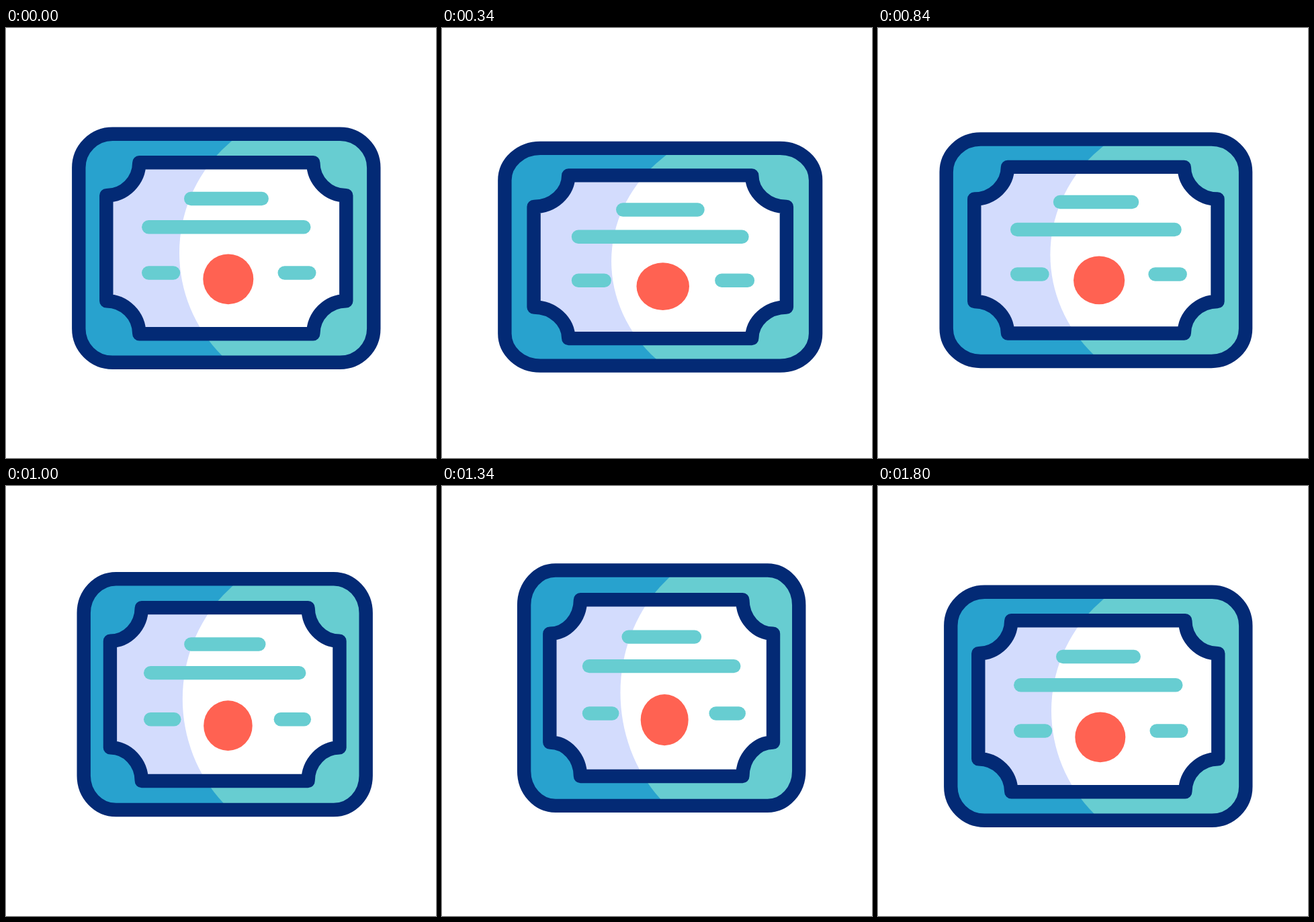
Recreate the animation shown at these times as an HTML page with a canvas. Size 640x640 px, loop 1820 ms.

```html
<!DOCTYPE html>
<html lang="en">
<head>
<meta charset="utf-8">
<title>Certificate bounce</title>
<style>
html, body { margin: 0; width: 100%; height: 100%; overflow: hidden; background: #fff; }
canvas { display: block; width: 640px; height: 640px; }
</style>
</head>
<body>
<canvas id="stage" width="640" height="640"></canvas>
<script>
const ctx = document.getElementById('stage').getContext('2d');
const LOOP = 1820, STEP = 20, BEAT = 600;
const NAVY = '#032a75', TEAL = '#67cdd1', BLUE = '#28a2ce';
const LILAC = '#d3dcfd', RED = '#ff6252', WHITE = '#fff';

// Poses: rest, squash, stretch. Sizes are those of the outer frame.
const REST = { cx: 327.8, cy: 327.8, w: 439, h: 340, shade: 0, seal: 0, rx: 37.5, ry: 37.4 };
const SQUASH = { cx: 322.7, cy: 349.45, w: 478.6, h: 312.9, shade: 1.5, seal: 1.4, rx: 40.4, ry: 34 };
const STRETCH = { cx: 326.5, cy: 296.35, w: 404.35, h: 352.1, shade: 4.5, seal: 2, rx: 35.2, ry: 38.2 };
const POSES = [REST, SQUASH, STRETCH, REST];

const smooth = p => p * p * (3 - 2 * p);
const spring = p => smooth(p) * 0.67 + p * (2 - p) * 0.33;

function poseAt(t) {
  const i = Math.min(2, Math.floor(t / BEAT));
  const p = Math.min(1, t / BEAT - i);
  const a = POSES[i], b = POSES[i + 1], pose = {};
  for (const k in a) {
    const ease = i === 1 && k !== 'cy' ? spring : smooth;
    pose[k] = a[k] + (b[k] - a[k]) * ease(p);
  }
  return pose;
}

function draw(t) {
  const s = poseAt(t);
  const sx = s.w / REST.w, sy = s.h / REST.h;
  // Map rest coordinates into the current pose; line weights stay constant.
  const X = x => s.cx + (x - REST.cx) * sx;
  const Y = y => s.cy + (y - REST.cy) * sy;

  function arc(x, y, r, from, to, ccw) {
    ctx.ellipse(X(x), Y(y), r * sx, r * sy, 0, from * Math.PI / 2, to * Math.PI / 2, ccw);
  }

  function cover() {
    const l = 108.3, r = 547.3, top = 157.8, b = 497.8, k = 50.2;
    ctx.beginPath();
    arc(l + k, top + k, k, 2, 3);
    arc(r - k, top + k, k, 3, 4);
    arc(r - k, b - k, k, 0, 1);
    arc(l + k, b - k, k, 1, 2);
    ctx.closePath();
  }

  function plaque() {
    const l = 149.3, r = 506.3, top = 200.3, b = 455.2, k = 49;
    ctx.beginPath();
    arc(l, top, k, 1, 0, true);
    arc(r, top, k, 2, 1, true);
    arc(r, b, k, 3, 2, true);
    arc(l, b, k, 4, 3, true);
    ctx.closePath();
  }

  function panel(path, dark, light) {
    ctx.save();
    path();
    ctx.fillStyle = dark;
    ctx.fill();
    ctx.clip();
    ctx.beginPath();
    ctx.ellipse(X(474.4) + s.shade, Y(334.5), 216.4 * sx, 216.4 * sy, 0, 0, 7);
    ctx.fillStyle = light;
    ctx.fill();
    ctx.restore();
    path();
    ctx.strokeStyle = NAVY;
    ctx.stroke();
  }

  function bar(x1, x2, y) {
    ctx.beginPath();
    ctx.moveTo(X(x1), Y(y));
    ctx.lineTo(X(x2), Y(y));
    ctx.strokeStyle = TEAL;
    ctx.stroke();
  }

  ctx.fillStyle = WHITE;
  ctx.fillRect(0, 0, 640, 640);
  ctx.lineWidth = 20.4;
  ctx.lineJoin = ctx.lineCap = 'round';

  panel(cover, BLUE, TEAL);
  panel(plaque, LILAC, WHITE);

  bar(275.2, 380.7, 254);
  bar(212.3, 443.3, 296.2);
  bar(212.3, 249, 364.5);
  bar(414.7, 451.3, 364.5);

  ctx.beginPath();
  ctx.ellipse(X(330.8) + s.seal, Y(373.8), s.rx, s.ry, 0, 0, 7);
  ctx.fillStyle = RED;
  ctx.fill();
}

const start = performance.now();
function tick() {
  const t = (performance.now() - start) % LOOP;
  draw(Math.floor(t / STEP + 0.01) * STEP);
  requestAnimationFrame(tick);
}
tick();
</script>
</body>
</html>
```
